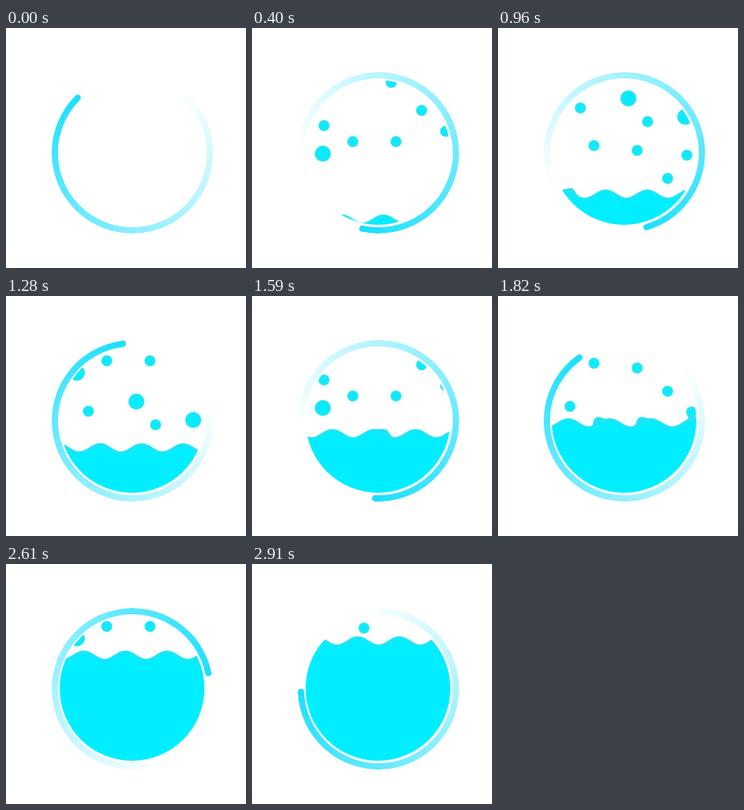
Animation of 300 by 300 pixels, one loop 2990 ms. Source, as an HTML page:

```html
<!DOCTYPE html>
<html lang="en">
<head>
<meta charset="utf-8">
<title>Filling circle loader</title>
<style>
  html, body { margin: 0; width: 100%; height: 100%; overflow: hidden; background: #fff; }
  svg { position: absolute; left: 0; top: 0; }
  #ring {
    position: absolute; left: 57px; top: 55px; width: 202px; height: 202px;
    border-radius: 50%;
    background: conic-gradient(from 90deg, rgba(28,223,255,0) 23%, rgb(28,223,255) 100%);
    -webkit-mask: radial-gradient(closest-side, transparent 92.5px, #000 93.5px);
    mask: radial-gradient(closest-side, transparent 92.5px, #000 93.5px);
  }
  #ring::after {
    content: ''; position: absolute; left: 194px; top: 97px; width: 8px; height: 8px;
    border-radius: 50%; background: rgb(28,223,255);
  }
</style>
</head>
<body>
<div id="ring"></div>
<svg width="300" height="300" viewBox="0 0 300 300">
  <defs>
    <clipPath id="bowl"><circle cx="157.5" cy="155.5" r="90.5"/></clipPath>
    <filter id="goo" filterUnits="userSpaceOnUse" x="40" y="40" width="240" height="240"
            color-interpolation-filters="sRGB">
      <feGaussianBlur stdDeviation="2.5"/>
      <feColorMatrix values="1 0 0 0 0  0 1 0 0 0  0 0 1 0 0  0 0 0 5 -1.7"/>
    </filter>
  </defs>
  <g clip-path="url(#bowl)">
    <g filter="url(#goo)" fill="#00eeff" stroke="#38dcec" stroke-width="2">
      <g id="drops"></g>
      <path id="water"/>
    </g>
  </g>
</svg>
<script>
const LOOP = 2990;
const STEPS = 38;
const TURNS = 5;
const ring = document.getElementById('ring');
const drops = document.getElementById('drops');
const water = document.getElementById('water');

// Groups of falling bubbles [x, y, r], repeated upwards by a fixed gap
const groups = [
  { gap: 190, copies: 3, dots: [[126, 194, 7], [180, 194, 7], [88.5, 209, 10]] },
  { gap: 190, copies: 2, dots: [[90, 174, 7], [212, 155, 7], [242, 181, 7]] },
  { gap: 184, copies: 2, dots: [[120, 114, 7], [174, 120, 7], [236, 126, 7]] },
  { gap: 184, copies: 2, dots: [[187, 84, 7], [163, 55, 10], [103, 67, 7], [234, 78, 10]] },
  { gap: 0, copies: 1, dots: [[140, -228, 7]] }
];

function addBubble(x, y, r) {
  const c = document.createElementNS('http://www.w3.org/2000/svg', 'circle');
  c.setAttribute('cx', x);
  c.setAttribute('cy', y);
  c.setAttribute('r', r - 1);
  drops.append(c);
}

for (const { gap, copies, dots } of groups)
  for (let copy = 0; copy < copies; copy++)
    for (const [x, y, r] of dots) addBubble(x, y - gap * copy, r);

function wavePath(level, crest) {
  let d = 'M50 275';
  for (let x = 50; x <= 266; x += 2) {
    const y = level - 5.3 * Math.cos((x - crest) * Math.PI / 26);
    d += `L${x} ${y.toFixed(2)}`;
  }
  return d + 'L266 275Z';
}

function draw(step) {
  const head = 225 + 360 * TURNS * step / STEPS;
  // Bubbles rush in from above, then fall at a steady pace
  const rush = Math.max(0, 1 - step / 9) ** 2;
  const fall = 11 * (step - 9) - 40 * rush;
  ring.style.transform = `rotate(${head}deg)`;
  drops.setAttribute('transform', `translate(0 ${fall})`);
  water.setAttribute('d', wavePath(261.9 - 4.46 * step, 185.5 - 4.25 * step));
}

const origin = performance.now();
function tick(now) {
  const t = Math.max(0, now - origin) % LOOP;
  draw(Math.min(STEPS - 1, Math.floor(t * STEPS / LOOP + 0.05)));
  requestAnimationFrame(tick);
}
draw(0);
requestAnimationFrame(tick);
</script>
</body>
</html>
```
